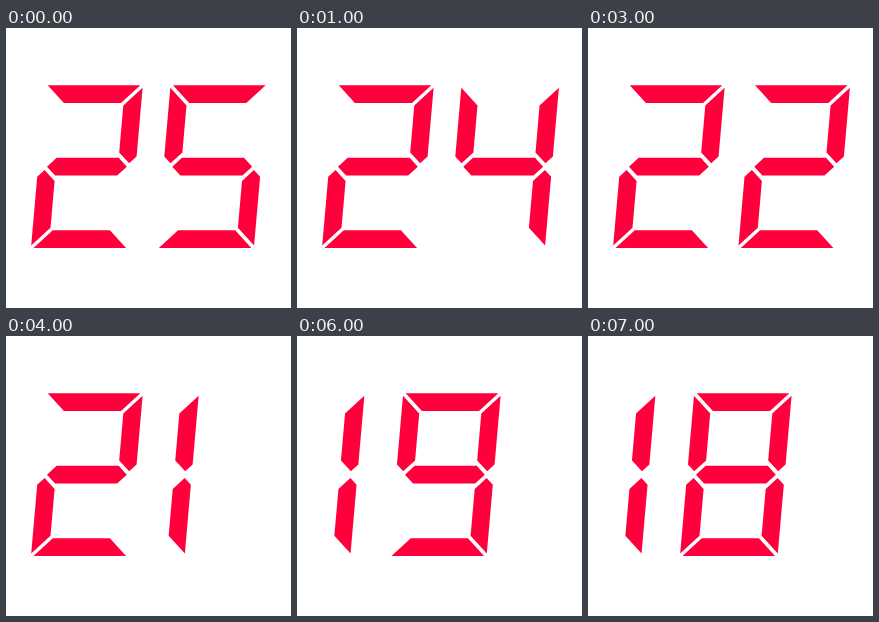
Write an HTML page with a canvas that moves like this. It is 285 px wide and 280 px high and loops after 8000 ms.

```html
<!DOCTYPE html>
<html lang="en">
<head>
<meta charset="utf-8">
<title>Countdown</title>
<style>
  html, body { margin: 0; width: 100%; height: 100%; overflow: hidden; background: #fff; }
  canvas { display: block; }
</style>
</head>
<body>
<canvas id="stage" width="285" height="280"></canvas>
<script>
const stage = document.getElementById('stage');
const ctx = stage.getContext('2d');
const COLOR = '#ff003c';
const START = 25, STEP = 1000, STEPS = 8;

// Digit metrics, measured from the centre of an upright digit.
const CENTER_X = 80.9, CENTER_Y = 138.63;
const HALF_W = 48.8, HALF_H = 81.37, THICK = 17.75;
const GAP = 2.5;             // how far each mitre steps back from the corner
const TIP_IN = 6.8, TIP_Y = 3.3;
const SLANT = Math.tan(5 * Math.PI / 180);

const ADVANCE = 125.3;       // distance between regular digits
const ONE_SHIFT = -69.25;    // the 1 sits at the left of its narrow cell
const AFTER_ONE = 67;        // distance to the digit after a 1

const flip = (points, sx, sy) => points.map(([x, y]) => [x * sx, y * sy]);

// All cuts run at 45 degrees; three bars give all seven segments by mirroring.
function buildSegments() {
  const inner = HALF_W - THICK;
  const tip = HALF_W - TIP_IN;
  const long = HALF_W - GAP, short = long - THICK;
  const middle = HALF_W - THICK / 2, half = THICK / 2;

  const top = [[-long, -HALF_H], [long, -HALF_H], [short, THICK - HALF_H], [-short, THICK - HALF_H]];
  const side = [
    [HALF_W, GAP - HALF_H],
    [HALF_W, -TIP_Y - TIP_IN],
    [tip, -TIP_Y],
    [inner, -TIP_Y - (tip - inner)],
    [inner, GAP + THICK - HALF_H]
  ];
  const edge = [[half - middle, -half], [middle - half, -half], [middle, 0]];
  const bar = [...edge, ...flip(edge, -1, -1)];

  return {
    a: top, d: flip(top, 1, -1), g: bar,
    b: side, c: flip(side, 1, -1), e: flip(side, -1, -1), f: flip(side, -1, 1)
  };
}

const SEGMENTS = buildSegments();
const DIGITS = ['abcdef', 'bc', 'abdeg', 'abcdg', 'bcfg',
  'acdfg', 'acdefg', 'abc', 'abcdefg', 'abcdfg'];

function drawDigit(digit, left) {
  const centerX = CENTER_X + left + (digit === 1 ? ONE_SHIFT : 0);
  for (const name of DIGITS[digit]) {
    ctx.beginPath();
    for (const [x, y] of SEGMENTS[name]) ctx.lineTo(centerX + x - y * SLANT, CENTER_Y + y);
    ctx.fill();
  }
}

function render(now) {
  const value = START - Math.floor(now / STEP) % STEPS;
  const tens = Math.floor(value / 10);
  ctx.fillStyle = '#fff';
  ctx.fillRect(0, 0, stage.width, stage.height);
  ctx.fillStyle = COLOR;
  drawDigit(tens, 0);
  drawDigit(value % 10, tens === 1 ? AFTER_ONE : ADVANCE);
}

const origin = performance.now();
function frame() {
  render(performance.now() - origin);
  requestAnimationFrame(frame);
}
frame();
</script>
</body>
</html>
```
